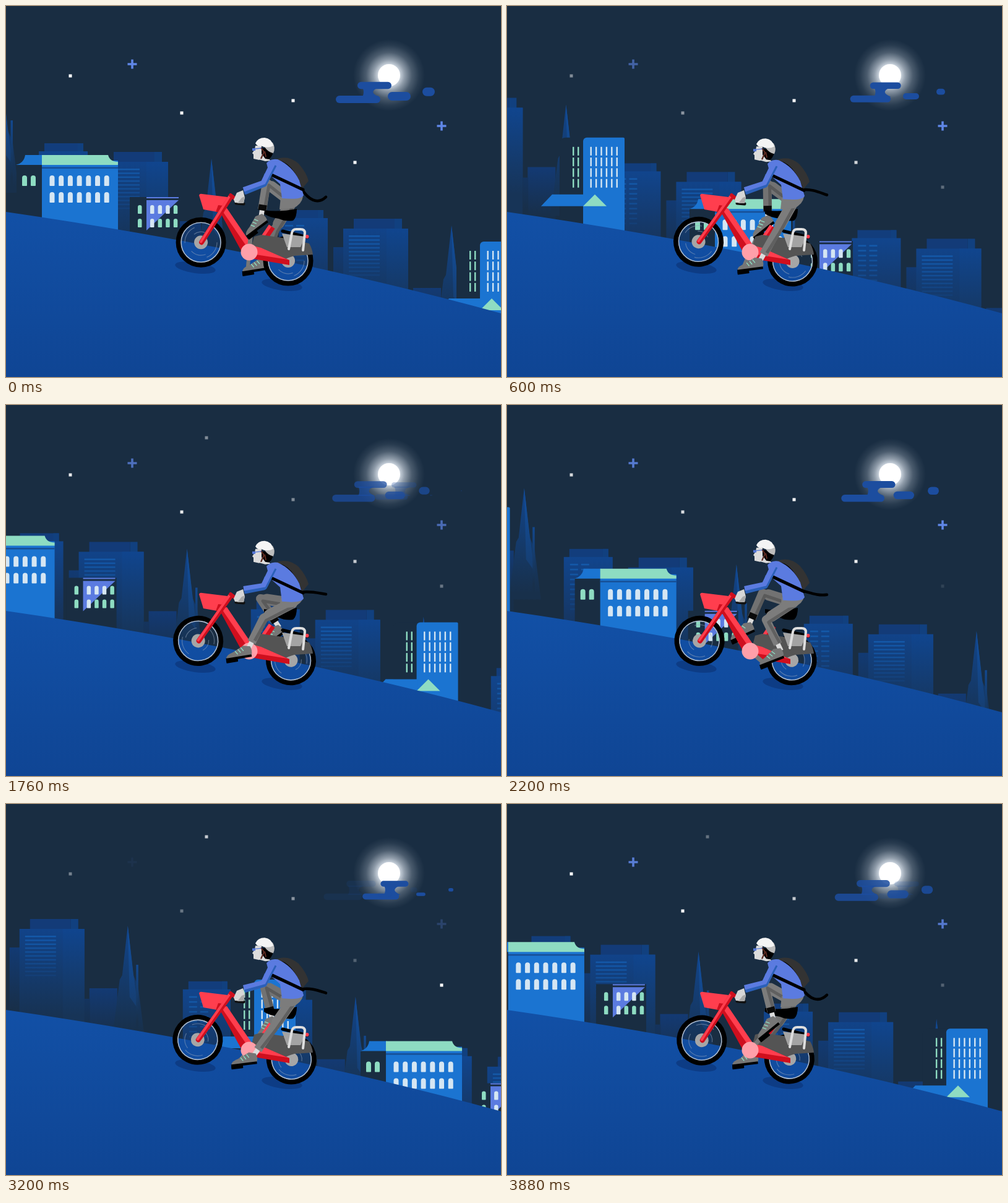
An HTML page with a canvas for the animation above (3.92 s loop, 800x600 px).

```html
<!DOCTYPE html>
<html>
<head>
<meta charset="utf-8">
<title>Night ride</title>
<style>
html, body { margin: 0; width: 100%; height: 100%; overflow: hidden; background: #192d42; }
canvas { display: block; }
</style>
</head>
<body>
<canvas id="stage" width="800" height="600"></canvas>
<script>
const ctx = document.getElementById('stage').getContext('2d');
const SKY = '#192d42', BLUE = '#1b74d1', MINT = '#8edcc2', PALE = '#d5e6f3', PURPLE = '#5b7be0';
const RED = '#ff3e4e', DARK_RED = '#cf0f1e', SKIN = '#dcdcdc';
const LOOP = 3920, STEP = 40;

const clamp = (v, lo = 0, hi = 1) => Math.min(hi, Math.max(lo, v));
const mix = (a, b, p) => a + (b - a) * p;
const cosDeg = d => Math.cos(d * Math.PI / 180);
const sinDeg = d => Math.sin(d * Math.PI / 180);

function rect(color, x, y, w, h) {
  ctx.fillStyle = color;
  ctx.fillRect(x, y, w, h);
}
function shape(color, d) {
  ctx.fillStyle = color;
  ctx.fill(new Path2D(d));
}
function line(color, width, d, cap = 'round') {
  ctx.strokeStyle = color;
  ctx.lineWidth = width;
  ctx.lineCap = cap;
  ctx.lineJoin = 'round';
  ctx.stroke(new Path2D(d));
}
function ellipse(color, x, y, rx, ry = rx, turn = 0) {
  ctx.fillStyle = color;
  ctx.beginPath();
  ctx.ellipse(x, y, rx, ry, turn, 0, 7);
  ctx.fill();
}
function pill(color, x, y, w, h, radii = h / 2) {
  ctx.fillStyle = color;
  ctx.beginPath();
  ctx.roundRect(x, y, w, h, radii);
  ctx.fill();
}
function at(x, y, draw, turn = 0) {
  ctx.save();
  ctx.translate(x, y);
  ctx.rotate(turn);
  draw();
  ctx.restore();
}
function fade(y0, y1, from, to) {
  const g = ctx.createLinearGradient(0, y0, 0, y1);
  g.addColorStop(0, from);
  g.addColorStop(1, to);
  return g;
}

// ---- sky ----
const KEYS = [0, 18, 36, 53, 56, 60];
const STARS = [ // x, y, is plus, opacity at each key
  [104, 113, 0, 1, .45, .4, .9, 1, 1],
  [284, 173, 0, 1, .5, .35, .9, 1, 1],
  [464, 153, 0, 1, 1, .5, .45, .75, 1],
  [564, 253, 0, 1, .8, .25, .75, .9, 1],
  [324, 53, 0, 0, 0, .75, .45, .33, 0],
  [704, 293, 0, 0, .3, 1, .35, .25, 0],
  [204, 94, 1, 1, .6, .06, .75, .9, 1],
  [704, 194, 1, 1, 1, .25, .7, .85, 1]
];

function drawStars(k) {
  const i = KEYS.findIndex(v => v > k) - 1;
  const p = (k - KEYS[i]) / (KEYS[i + 1] - KEYS[i]);
  for (const [x, y, plus, ...levels] of STARS) {
    ctx.globalAlpha = mix(levels[i], levels[i + 1], p);
    if (plus) line('#5f86e6', 3.6, `M${x - 7.5} ${y}h15M${x} ${y - 7.5}v15`, 'butt');
    else rect('#fff', x - 2.5, y - 2.5, 5, 5);
  }
  ctx.globalAlpha = 1;
}

function drawMoon() {
  const glow = ctx.createRadialGradient(619, 112, 16, 619, 112, 58);
  [[0, .9], [.22, .56], [.5, .24], [.78, .07], [1, 0]]
    .forEach(([stop, a]) => glow.addColorStop(stop, `rgba(235,242,250,${a})`));
  ellipse(glow, 619, 112, 58);
  ellipse('#fff', 619, 112, 18);
}

function drawCloud(k) {
  const alpha = clamp(Math.min((k + 28) / 28, (60 - k) / 24));
  if (!alpha) return;
  const small = k < 0 ? 1 + k / 54 : 1 - k / 60;
  const big = 1 - .3 * (1 - small);
  const puff = (x, y, w, h, s) => pill('#1c4d9f', x - w * s / 2, y - h * s / 2, w * s, h * s);
  const mid = 590 + .97 * k;
  ctx.globalAlpha = alpha;
  shape('#1c4d9f', `M${mid - 14} 132H${mid + 12}Q${mid - 6} 139 ${mid + 13} 147H${mid - 14}Q${mid - 10} 139 ${mid - 14} 132Z`);
  puff(595.5 + .9 * k, mix(131.5, 128.5, big), 55, 11.4, big);
  puff(569 + 1.02 * k, mix(143, 151, big), 72, 12, big);
  puff(635.5 + .97 * k, 146, 37, 14, small);
  puff(683 + k, 138.7, 20, 14, small);
  ctx.globalAlpha = 1;
}

// ---- distant buildings, relative to the wide block ----
function drawFarBlock() {
  const body = fade(0, 165, '#114389', '#182f49');
  const tall = fade(0, 140, '#10458e', '#173457');
  // windowed block
  rect('#123d7c', -95, -30, 63, 14);
  rect('#11407f', -41, -30, 9, 14);
  rect(fade(-17, 130, '#11458d', '#183050'), -104, -17, 79, 190);
  for (let i = 0; i < 10; i++) {
    ctx.globalAlpha = 1 - i / 11;
    for (const x of [-94, -76]) rect('#1459a9', x, -6 + i * 8, 13, 2.6);
  }
  ctx.globalAlpha = 1;
  // wide block
  rect(fade(30, 130, '#123a73', '#182f49'), -16, 30, 17, 150);
  rect('#133b78', 17, -16, 66, 17);
  rect('#11407f', 83, -16, 12, 17);
  rect(body, 0, 0, 105, 200);
  rect(tall, 70, 0, 35, 200);
  for (let i = 0; i < 11; i++) {
    ctx.globalAlpha = 1 - i / 12;
    rect('#1459a9', 9, 11 + i * 6.3, 50, 2.4);
  }
  ctx.globalAlpha = 1;
  // low blocks
  rect(fade(95, 175, '#133a74', '#182f49'), 113, 96, 45, 110);
  rect(fade(112, 165, '#14345f', '#182f49'), 105, 113, 9, 90);
  // spire
  shape(fade(-5, 165, '#11458c', '#18304b'), 'M175-5L166 75L162 82L150 175H202L192 95L188 84L184 75Z');
  shape(fade(-5, 150, '#1150a2', '#173a66'), 'M175-5L184 72L192 130L178 110Z');
  rect(fade(58, 150, '#12488f', '#18304b'), 188.5, 58, 3.5, 110);
}

// ---- near buildings, relative to the loop start ----
const archWindow = (color, x, y, w, h) => pill(color, x, y, w, h, [w / 2, w / 2, 1, 1]);

function drawNearBlock() {
  // mint roof hall
  rect(SKY, 17, 256, 41, 190);
  rect(BLUE, 58, 250, 123, 200);
  shape(BLUE, 'M16 257Q29 254 31 241H60V257Z');
  shape(MINT, 'M58 241H165Q168 252 181 252V257H58Z');
  rect('#174f96', 58, 260.5, 123, 2.5);
  for (const y of [274, 301]) {
    for (let i = 0; i < 7; i++) archWindow(PALE, 70.5 + i * 14.7, y, 8, 17);
  }
  for (const x of [26, 40]) archWindow(MINT, x, 274, 8, 17);
  // small striped house
  rect(SKY, 200, 309, 81, 110);
  rect(PURPLE, 227, 309, 52, 2);
  shape(PURPLE, 'M227 314H279L227 363Z');
  for (const y of [322, 344]) {
    archWindow(MINT, 213, y, 6.5, 14);
    for (let i = 0; i < 4; i++) archWindow(i < (y < 330 ? 3 : 1) ? PALE : MINT, 233 + i * 12.6, y, 6.5, 14);
  }
  // tower
  at(766, 381, () => {
    shape(SKY, 'M-38 220V8Q-36 0-28 0H2V220Z');
    pill(BLUE, 0, 0, 67, 230, [6, 2, 0, 0]);
    for (let row = 0; row < 4; row++) {
      const y = 15 + row * 17.3;
      for (let i = 0; i < 6; i++) rect(PALE, 11.5 + i * 8.4, y, 2.4, 14);
      for (const x of [-17, -9]) rect(MINT, x, y, 2.4, 14);
    }
    shape(BLUE, 'M-68 111L-50 92H2V111Z');
    shape(MINT, 'M0 111L19 92L38 111Z');
  });
}

function drawCity(k) {
  const p = k / 60;
  const stops = [[-181, 127], [157, 252], [545, 360], [933, 468]];
  for (let i = 2; i >= 0; i--) {
    const [a, b] = [stops[i], stops[i + 1]];
    at(mix(a[0], b[0], p), mix(a[1], b[1], p), drawFarBlock);
  }
  for (let i = 0; i < 2; i++) at(926.7 * p - 921 * i, 237.7 * p - 239.5 * i, drawNearBlock);
}

function drawHill() {
  shape(fade(333, 600, '#1250a6', '#0f4594'), 'M0 333Q431 395.5 800 497V600H0Z');
  ellipse('#0d3c85', 306, 423, 33, 9, .14);
  ellipse('#0d3c85', 446, 451, 33, 9, .14);
}

// ---- bike and rider ----
const CRANK = { x: 393, y: 398 };

function drawWheel(x, y, turn) {
  at(x, y, () => {
    const ring = (color, w, r, a = 0, b = 7) => {
      ctx.strokeStyle = color;
      ctx.lineWidth = w;
      ctx.beginPath();
      ctx.arc(0, 0, r, a, b);
      ctx.stroke();
    };
    ring('#000', 8, 36.5);
    ring('#a9b8cc', 1.6, 32);
    for (const [r, a] of [[26, 0], [26, 3.1], [21, 1.2], [17, 4]]) ring('rgba(150,165,190,.5)', 1.2, r, a, a + 1.2);
    ellipse('#a6a6a6', 0, 0, 11);
  }, turn);
}

function drawLeg(hip, pedal, foot, color, shade) {
  const c = cosDeg(foot), s = sinDeg(foot), L = 51.5;
  const ax = pedal.x + 32 * c - 14 * s, ay = pedal.y - 32 * s - 14 * c;
  const dx = ax - hip.x, dy = ay - hip.y, d = Math.hypot(dx, dy);
  const bend = Math.sqrt(Math.max(0, L * L - d * d / 4)) / d;
  const kx = hip.x + dx / 2 - dy * bend, ky = hip.y + dy / 2 + dx * bend;
  const shin = p => `${mix(kx, ax, p)} ${mix(ky, ay, p)}`;
  line(SKIN, 8, `M${shin(.8)}L${shin(1.08)}`, 'butt');
  line(color, 14, `M${hip.x} ${hip.y}L${kx} ${ky}L${shin(.85)}`, 'butt');
  line(color, 18, `M${hip.x} ${hip.y}L${mix(hip.x, kx, .8)} ${mix(hip.y, ky, .8)}`);
  line(shade, 5, `M${hip.x + 3} ${hip.y + 5}L${kx + 4} ${ky + 4}L${mix(kx, ax, .8) + 4} ${mix(ky, ay, .8)}`, 'butt');
  if (ay < 375) line('#0a0a0a', 13, `M${shin(.7)}L${shin(.88)}`, 'butt');
  at(pedal.x, pedal.y, () => {
    pill('#000', -9, 1, 19, 6, 1);
    shape('#767676', 'M-8 0Q-9-6 4-9L22-17L33-14Q36-6 33 0Z');
    shape('#000', 'M-9-1H33V3H-8Z');
    line(MINT, 1.4, 'M8-10l3 5M13-12l3 5M18-14l3 5');
  }, -foot * Math.PI / 180);
}

function drawFrame(front, rear) {
  drawWheel(front.x, front.y, front.turn);
  drawWheel(rear.x, rear.y, rear.turn);
  // seat post, rack and cover
  line(DARK_RED, 11, 'M430 357L411 385', 'butt');
  line(RED, 5, 'M427 355L408 383', 'butt');
  line('#000', 5, 'M447 364L487 374');
  ellipse(RED, 486.5, 373, 3);
  shape('#545454', 'M397 388L401 373L412 370L447 375L490 384Q495 393 496 402L466 404Q454 407 448 412L400 401Z');
  shape('#a3a3a3', 'M446 368L484 373L476 390L454 390Z');
  line('#dedede', 4, 'M457 393L462 367Q463 361 469 361H476Q483 361 483 367L480 395');
  shape(DARK_RED, 'M386 386L410 391L458 411V419L400 409Z');
  shape(RED, 'M392 386L412 391L455 410L404 402Z');
  shape(DARK_RED, 'M343 328L356 327L399 394L384 403Z');
  shape(RED, 'M348 329L357 327L401 392L391 392Z');
  // seat, basket, fork
  shape('#000', 'M417 330Q440 334 470 328Q470 342 464 347Q452 349 441 344Q423 341 417 336Z');
  shape(RED, 'M312 306Q313 303 317 304L358 309L347 334L319 329Z');
  shape(DARK_RED, 'M343 322L351 323L347 334L339 333Z');
  line(DARK_RED, 8, `M363 309L${front.x + 1} ${front.y}`);
  line(RED, 4, `M361 308L${front.x} ${front.y - 1}`);
  line(DARK_RED, 6, 'M363 306L372 313');
}

function drawTorso(sag) {
  at(0, sag, () => {
    // backpack
    shape('#333', 'M433 249Q455 239 473 255Q486 270 489 283L477 297L460 288Z');
    shape('#000', 'M430 250Q447 246 461 262Q476 280 478 297L465 287Z');
    // jacket
    shape(PURPLE, 'M421 254Q428 246 439 248Q462 258 474 282L481 306Q478 314 446 311L443 288L426 273Z');
    line('#000', 5, 'M429 273L480 297');
    // neck, face and hair
    shape(SKIN, 'M407 240L420 240L427 250L419 251L408 248Z');
    shape('#000', 'M411 230H432Q433 241 425 248L419 247L414 240Z');
    shape(SKIN, 'M403 226H413V246L409 249L400 247V240L398 238L402 232Z');
    line('#5b2a20', 2.2, 'M412 229L417 236L412 247M418 235L420 244', 'butt');
    rect('#5578d8', 398, 230, 5, 4);
    line('#5578d8', 1.4, 'M403 231L412 230');
    // helmet
    shape('#bdbdbd', 'M408 223Q420 218 431 221Q436 229 432 238Q423 236 418 228Z');
    shape('#f4f4f4', 'M403 222Q407 213 418 213Q429 214 432 226Q422 231 412 226Q407 228 403 222Z');
  });
}

function drawArm(sag) {
  line('#2b60b8', 9, `M422 ${272 + sag}L417 ${288 + sag}L385 301`, 'butt');
  line(PURPLE, 11, `M432 ${255 + sag}L418 ${284 + sag}`);
  line(PURPLE, 8, `M418 ${285 + sag}L384 297`, 'butt');
  line('#2b60b8', 3, `M436 ${258 + sag}L420 ${289 + sag}L385 302`, 'butt');
  line('#111', 5, 'M372 319L384 320');
  shape('#d6d6d6', 'M373 302L383 298L386 310L384 319L370 318L368 313Z');
  shape('#a8a8a8', 'M381 310L386 308L384 319L374 319Z');
}

function drawRider(q) {
  const angle = 9 * q - 5, sway = cosDeg(9 * q + 9);
  const sag = 4 - 4 * cosDeg(18 * q - 9);
  const px = 31 * sinDeg(angle), py = 31 * cosDeg(angle);
  const lean = 16 * cosDeg(9 * q + 30);
  const far = { x: CRANK.x + px, y: CRANK.y + py };
  const near = { x: CRANK.x - px, y: CRANK.y - py };
  const hip = { x: 462, y: 317 + sag / 2 };
  const drop = (1 + cosDeg(9 * q + 20)) / 2;
  const turn = -q * Math.PI / 10;

  line('#777', 6, `M${CRANK.x} ${CRANK.y}L${far.x} ${far.y}`);
  drawLeg(hip, far, 23 - lean, '#727272', '#5a5a5a');
  drawFrame({ x: 312.3 + 2.8 * sway, y: 381.7 + .5 * sway, turn },
            { x: 458.8 - 2.8 * sway, y: 412.5 - .5 * sway, turn });
  line('#777', 7, `M${CRANK.x} ${CRANK.y}L${near.x} ${near.y}`);
  ellipse('#ff9fa9', CRANK.x, CRANK.y, 13.5);
  drawLeg(hip, near, 23 + lean, '#7c7c7c', '#606060');
  shape('#7c7c7c', `M444 ${309 + sag / 2}L480 ${308 + sag / 2}Q478 321 464 327L442 329Z`);
  line('#000', 4.5, `M478 ${296 + sag}C${mix(492, 488, drop)} ${mix(295, 313, drop) + sag / 2} ${mix(504, 503, drop)} ${mix(301, 323, drop)} 517 ${mix(305.5, 309, drop)}`);
  drawTorso(sag);
  drawArm(sag);
}

function render(now) {
  // artwork runs at 30 steps a second, shown every 40 ms
  const tick = Math.round(Math.floor((now % LOOP) / STEP) * STEP * .03);
  const k = tick % 60;
  rect(SKY, 0, 0, 800, 600);
  drawStars(k);
  drawMoon();
  drawCloud(k);
  drawCloud(k - 60);
  drawCity(k);
  drawHill();
  drawRider(tick % 40);
}

function loop(now) {
  render(now);
  requestAnimationFrame(loop);
}
render(0);
requestAnimationFrame(loop);
</script>
</body>
</html>
```
